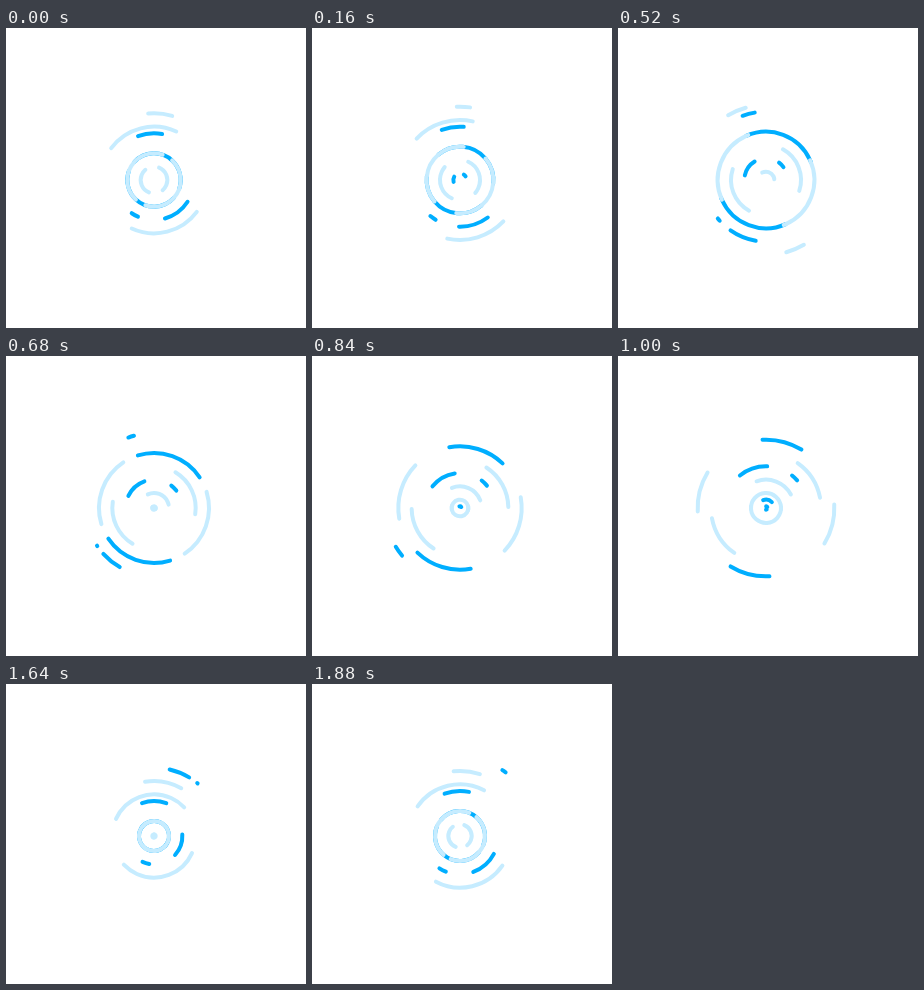
An HTML page with a canvas for the animation above (1.92 s loop, 300 by 300 pixels).

```html
<!DOCTYPE html>
<html lang="en">
<head>
<meta charset="utf-8">
<title>Expanding arcs</title>
<style>
  html, body { margin: 0; width: 100%; height: 100%; overflow: hidden; background: #fff; }
  canvas { display: block; width: 300px; height: 300px; }
</style>
</head>
<body>
<canvas id="stage"></canvas>
<script>
const LOOP = 1920, STEP = 40, SIZE = 300, MAX_R = 80;
const CX = 148, CY = 152;
const BLUE = '#00aeff', LIGHT = '#c6ecff';

const canvas = document.getElementById('stage');
const scale = window.devicePixelRatio || 1;
canvas.width = canvas.height = SIZE * scale;
const ctx = canvas.getContext('2d');
ctx.scale(scale, scale);
ctx.lineWidth = 4;
ctx.lineCap = 'round';

// Angles are in degrees, clockwise from the right.
function arc(r, color, start, length) {
  const rad = Math.PI / 180;
  const sweep = Math.min(360, Math.max(length, 0.1));
  ctx.strokeStyle = color;
  ctx.beginPath();
  ctx.arc(CX, CY, r, start * rad, (start + sweep) * rad);
  ctx.stroke();
}

function pair(r, color, start, length) {
  arc(r, color, start, length);
  arc(r, color, start + 180, length);
}

// A long arc chasing a short one; both shrink as they spread.
function chase(r, f, turn) {
  arc(r, BLUE, turn - 210 + 156 * f, 47 * (1 - f ** 3));
  const short = 24 * (1 - f / 0.87);
  if (short > 0) arc(r, BLUE, turn - 44 - 9 * f * f - short / 2, short);
}

// Each ring grows from the centre for one whole loop after its birth.
const rings = [
  { birth: 0, draw: (r, f) => chase(r, f, 0) },
  { birth: 320, draw: (r, f) => arc(r, LIGHT, -120 + 30 * f, 125 * (1 - f)) },
  { birth: 640, draw: (r, f) => pair(r, LIGHT, -200 + 85 * f, 234 * (1 - f)) },
  { birth: 800, draw: (r, f) => arc(r, BLUE, -110, 72 * (1 - f)) },
  { birth: 960, draw: (r, f) => chase(r, f, 120 + 90 * f) },
  { birth: 1280, draw: (r, f) => {
    pair(r, BLUE, -165.5 + 85 * f, 234 * (1 - f));
    pair(r, LIGHT, -255.5 + 85 * f, 234 * (1 - f));
  } },
  { birth: 1600, draw: (r, f) => pair(r, LIGHT, -72 + 25 * f, 141 * (1 - f)) }
];

function render(t) {
  ctx.fillStyle = '#fff';
  ctx.fillRect(0, 0, SIZE, SIZE);
  for (const { birth, draw } of rings) {
    const age = t > birth || birth === 0 ? t - birth : t - birth + LOOP;
    const f = age / LOOP;
    if (f > 0) draw(MAX_R * f, f);
  }
}

function tick(now) {
  const step = Math.floor((now + 4) / STEP);
  render((step * STEP) % LOOP);
  requestAnimationFrame(tick);
}

render(0);
requestAnimationFrame(tick);
</script>
</body>
</html>
```
